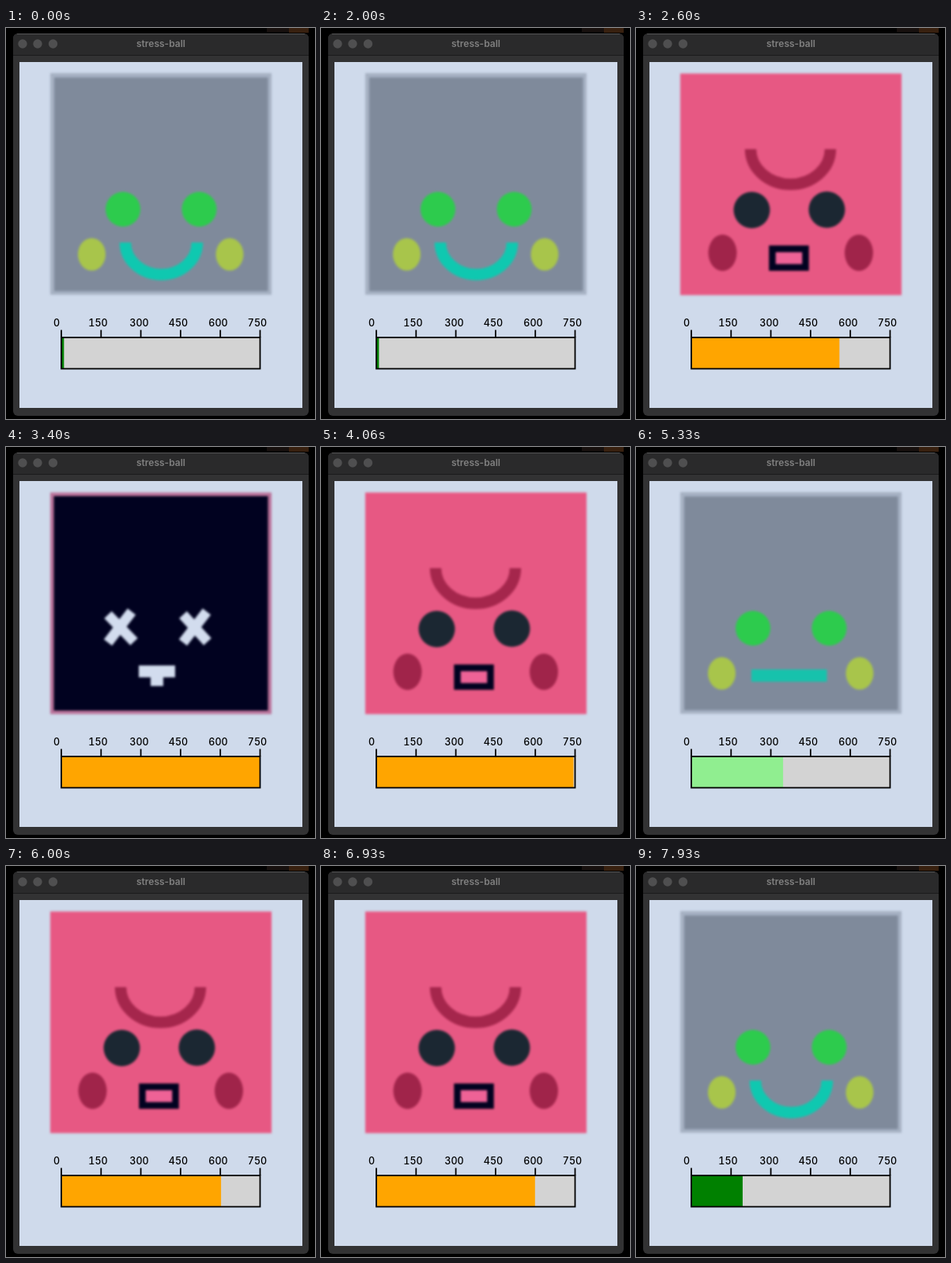
These frames come from a looping animation (391 px wide and 494 px high, 8000 ms). An HTML page:

```html
<!DOCTYPE html>
<html lang="en">
<head>
<meta charset="utf-8">
<title>stress-ball</title>
<style>
  html, body { margin: 0; height: 100%; overflow: hidden; background: #000; }
  svg { display: block; width: 391px; height: 494px; }
  text { font-family: Inter, "DejaVu Sans", sans-serif; text-anchor: middle; }
  .title { font-size: 12px; font-weight: 600; fill: #808080; }
  .scale { font-size: 12.5px; font-weight: 500; font-variant-numeric: tabular-nums; }
  .line { fill: none; stroke-width: 14.5; }
</style>
</head>
<body>
<svg viewBox="0 0 391 494">
  <defs>
    <filter id="soft" filterUnits="userSpaceOnUse" x="40" y="43" width="312" height="310" color-interpolation-filters="sRGB">
      <feGaussianBlur stdDeviation="1.4"/>
    </filter>
  </defs>
  <rect x="330" width="28" height="5" fill="#17100e"/>
  <rect x="358" width="25" height="6" fill="#38200f"/>
  <rect x="9" y="7" width="374" height="483" rx="6" fill="#323233"/>
  <path d="M9 34V13a6 6 0 0 1 6-6H377a6 6 0 0 1 6 6V34Z" fill="#2a2a2b"/>
  <path d="M14 7.5H378" stroke="#565657"/>
  <path d="M9 34.5H383" stroke="#1b1b1c"/>
  <g fill="#4f4f50">
    <circle cx="21" cy="20" r="5.7"/><circle cx="40" cy="20" r="5.7"/><circle cx="59.5" cy="20" r="5.7"/>
  </g>
  <text class="title" x="196" y="24">stress-ball</text>
  <rect x="17" y="43" width="358" height="437" fill="#cfdaeb"/>

  <g filter="url(#soft)">
    <g id="calm">
      <rect x="56" y="57" width="280" height="280" fill="#7f8a9b" opacity=".5"/>
      <rect x="61" y="62.5" width="270.5" height="270" fill="#7f8a9b"/>
      <g fill="#2dcb4d">
        <circle cx="148" cy="229" r="22"/><circle cx="244.5" cy="229" r="22"/>
      </g>
      <g fill="#a8c54b">
        <ellipse cx="108.5" cy="286" rx="17.5" ry="20.5"/><ellipse cx="283" cy="286" rx="17.5" ry="20.5"/>
      </g>
      <path id="smile" class="line" d="M151 271A45.5 40.5 0 0 0 242 271" stroke="#0fc8b0"/>
      <rect id="flat" x="146" y="281" width="95.5" height="15.5" fill="#17c2ac"/>
    </g>
    <g id="angry">
      <rect x="56" y="57.5" width="280" height="280" fill="#e75883"/>
      <path class="line" d="M145 153A50.5 44.5 0 0 0 246 153" stroke="#a5264c"/>
      <g fill="#1b2732">
        <circle cx="146.5" cy="230" r="23"/><circle cx="241.5" cy="229.5" r="23"/>
      </g>
      <g fill="#a0244a">
        <ellipse cx="109.5" cy="284" rx="18" ry="23"/><ellipse cx="282" cy="284" rx="18" ry="23"/>
      </g>
      <rect x="172.5" y="279" width="42" height="23.5" fill="#ee6296" stroke="#010220" stroke-width="8.5"/>
    </g>
    <g id="dead">
      <rect x="56" y="57.5" width="280" height="280" fill="#b8618c" opacity=".85"/>
      <rect x="60.5" y="62" width="271" height="271" fill="#010220"/>
      <path d="M129 212L162 246M159 208L129 247M224 212L255 246M254 208L224 247" stroke="#d2dcee" stroke-width="13"/>
      <path d="M168 276H214V291H199V302H183V291H168Z" fill="#d2dcee"/>
    </g>
  </g>

  <rect x="70" y="391" width="251" height="39" fill="#d3d3d3"/>
  <rect id="bar" x="70" y="391" height="39"/>
  <rect x="70" y="391" width="251.5" height="39.5" fill="none" stroke="#000" stroke-width="1.8"/>
  <g id="scale"></g>
</svg>
<script>
const $ = id => document.getElementById(id);
const LOOP = 8000, STEP = 1000 / 15, MAX = 750, WIDTH = 251;

// [step, pressure], linear in between
const keys = [
  [0, 10], [6, 350], [17, 350], [21, 10], [32, 10], [39, 560], [46, 560],
  [51, 750], [60, 750], [68, 714], [74, 714], [76, 410], [77, 410], [80, 347],
  [89, 347], [90, 604], [97, 700], [103, 700], [106, 400], [107, 400],
  [109, 320], [118, 320], [119, 194], [120, 194]
];

$('scale').innerHTML = [64, 116.5, 168.5, 218, 268.5, 318].map((x, i) =>
  `<text class="scale" x="${x}" y="377">${i * 150}</text>
   <path d="M${70 + i * 50.3} 381.5V391" stroke="#000" stroke-width="1.8"/>`).join('');

function pressure(step) {
  const i = keys.findIndex(k => k[0] > step);
  const [a, p] = keys[i - 1], [b, q] = keys[i];
  return p + (q - p) * (step - a) / (b - a);
}

function show(id, on) {
  $(id).style.display = on ? '' : 'none';
}

function draw(now) {
  const step = Math.floor((now % LOOP + 7) / STEP) % 120;
  const p = pressure(step);
  show('calm', p < 450);
  show('smile', p < 300);
  show('flat', p >= 300);
  show('angry', p >= 450 && p < MAX);
  show('dead', p >= MAX);
  $('bar').setAttribute('width', p / MAX * WIDTH);
  $('bar').setAttribute('fill', p < 300 ? '#008000' : p < 450 ? '#90ee90' : '#ffa500');
  requestAnimationFrame(draw);
}
draw(0);
</script>
</body>
</html>
```
